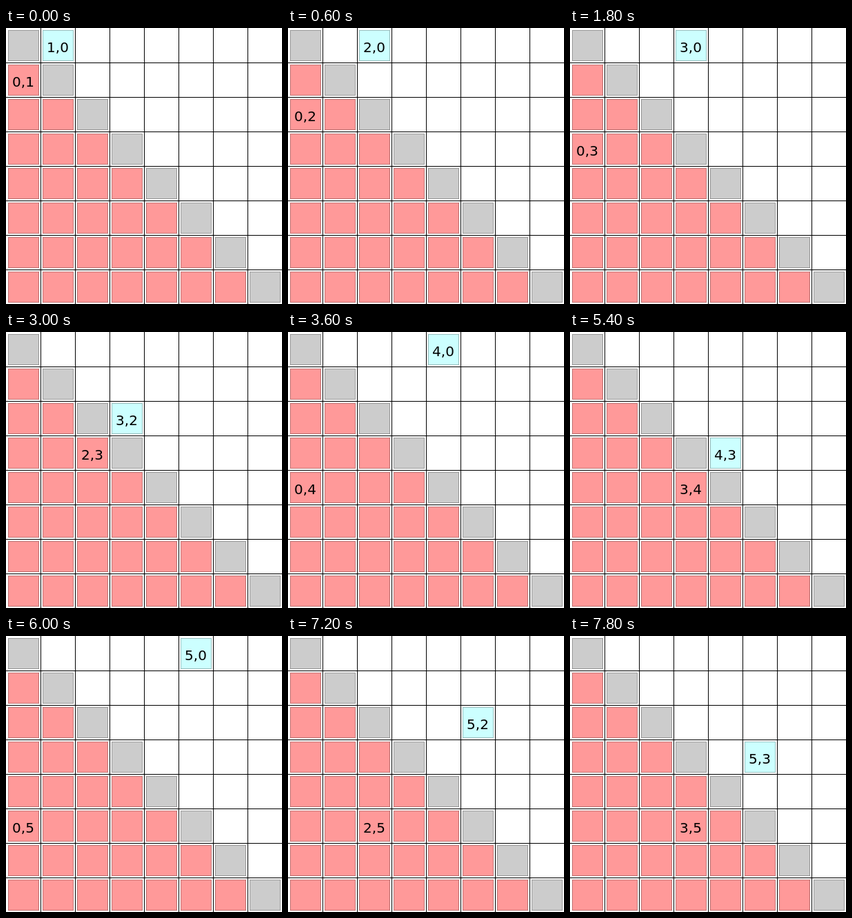
These frames come from a looping animation (400x400 px, 8 s). An HTML page:

```html
<!DOCTYPE html>
<html lang="en">
<head>
<meta charset="utf-8">
<title>Triangular pairs</title>
<style>
  html, body { margin: 0; width: 100%; height: 100%; overflow: hidden; background: #fff; }
  svg { display: block; width: 100%; height: 100%; }
  text { font: 20px "DejaVu Sans", sans-serif; text-anchor: middle; fill: #000; }
</style>
</head>
<body>
<svg id="stage" viewBox="0 0 400 400"></svg>
<script>
const NS = "http://www.w3.org/2000/svg";
const SIZE = 50, COUNT = 8, STEP = 600, LOOP = 8000;
const stage = document.getElementById("stage");

function add(tag, attrs, parent = stage) {
  const node = document.createElementNS(NS, tag);
  for (const key in attrs) node.setAttribute(key, attrs[key]);
  return parent.appendChild(node);
}

function place(node, col, row) {
  node.setAttribute("transform", `translate(${col * SIZE} ${row * SIZE})`);
}

function addCell(fill, edge) {
  return add("rect", { x: 3.5, y: 3.5, width: 44, height: 44, fill, stroke: edge });
}

function addLabel() {
  return add("text", { x: 25, y: 35 });
}

// Grid lines, each exactly one pixel wide
for (let i = 1; i < COUNT; i++) {
  add("rect", { x: i * SIZE, y: 0, width: 1, height: 400 });
  add("rect", { x: 0, y: i * SIZE, width: 400, height: 1 });
}

for (let row = 0; row < COUNT; row++) {
  for (let col = 0; col <= row; col++) {
    const cell = col === row ? addCell("#ccc", "#999") : addCell("#f99", "#bf7373");
    place(cell, col, row);
  }
}

const marker = addCell("#cff", "#99bfbf");
const upper = addLabel();
const lower = addLabel();

// Walks down each column above the diagonal, one column after another
function pairAt(step) {
  let col = 1;
  while (step >= col) step -= col++;
  return [col, step];
}

function draw(time) {
  const [col, row] = pairAt(Math.floor((time % LOOP) / STEP));
  place(marker, col, row);
  place(upper, col, row);
  place(lower, row, col);
  upper.textContent = `${col},${row}`;
  lower.textContent = `${row},${col}`;
}

function tick() {
  draw(performance.now());
  requestAnimationFrame(tick);
}
tick();
</script>
</body>
</html>
```
